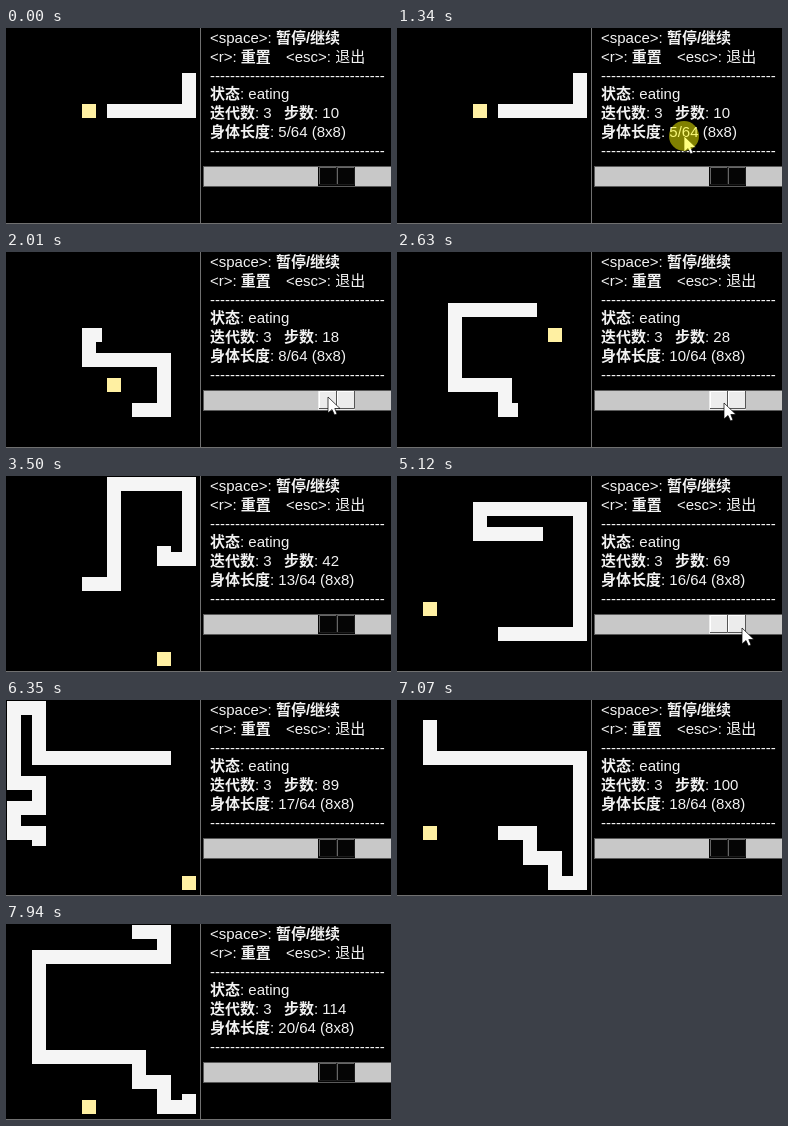
Animation, 385 px wide and 196 px high, one loop 7.99 s. Source, as an HTML page:

```html
<!DOCTYPE html>
<html lang="zh">
<head>
<meta charset="utf-8">
<title>Snake</title>
<style>
  html, body { margin: 0; width: 100%; height: 100%; overflow: hidden; background: #000; }
  svg { display: block; width: 385px; height: 196px; }
  text { font: 15px "Liberation Sans", "Noto Sans CJK SC", "Noto Sans CJK", sans-serif; fill: #f2f2f2; white-space: pre; }
  .b { font-weight: bold; }
  #snake { fill: none; stroke: #f5f5f5; stroke-width: 14; stroke-linecap: square; stroke-linejoin: miter; }
  #food { fill: #fff0a2; }
  #thumb { --face: #050505; --light: #666; --dark: #1c1c1c; }
  #thumb.hover { --face: #ececec; --light: #fff; --dark: #555; }
  .face { fill: var(--face); }
  .light { fill: none; stroke: var(--light); }
  .dark { fill: none; stroke: var(--dark); }
</style>
</head>
<body>
<svg viewBox="0 0 385 196">
  <defs>
    <g id="half">
      <rect class="face" width="18" height="18"/>
      <path class="dark" d="M0 17.5H17.5V0"/>
      <path class="light" d="M.5 17V.5H17"/>
    </g>
  </defs>
  <rect width="385" height="196"/>
  <path d="M194.5 0V195M0 195.5H385" stroke="#707070" fill="none"/>
  <rect id="food" width="14" height="14"/>
  <polyline id="snake"/>

  <text x="204" y="15">&lt;space&gt;: <tspan class="b">暂停/继续</tspan></text>
  <text x="204" y="34">&lt;r&gt;: <tspan class="b">重置</tspan></text>
  <text x="280" y="34">&lt;esc&gt;: 退出</text>
  <text class="rule" x="204" y="53"></text>
  <text x="204" y="71"><tspan class="b">状态</tspan>: eating</text>
  <text x="204" y="90"><tspan class="b">迭代数</tspan>: 3</text>
  <text x="278" y="90"><tspan class="b">步数</tspan>: <tspan id="steps">10</tspan></text>
  <text x="204" y="109"><tspan class="b">身体长度</tspan>: <tspan id="size">5</tspan>/64 (8x8)</text>
  <text class="rule" x="204" y="128"></text>

  <rect x="197.5" y="138.5" width="190" height="20" fill="#c8c8c8" stroke="#5a5a5a"/>
  <g id="thumb">
    <rect class="face" x="312" y="139" width="37" height="19"/>
    <use href="#half" x="313" y="139"/>
    <use href="#half" x="331" y="139"/>
  </g>

  <g id="cursor">
    <path d="M0 0V16L4 12.5L6.5 18L9 17L6.8 11.5H12Z" fill="#fff" stroke="#000" stroke-width=".7"/>
    <circle id="click" r="15" fill="#ff0" opacity=".5"/>
  </g>
</svg>
<script>
const LOOP = 7990, STEP_MS = 61.8, CLOCK_START = 844;
const FIRST_STEP = 5, PAUSED_STEP = 10, BASE_SIZE = 5;
const $ = id => document.getElementById(id);

// Cells (column, row) the snake steers for; a star marks food
const goals = "33* 64* 66* 45* 25* 62 63* 70* 44* 34 67* 32 31* 71* 16 " +
  "15* 05 14 03 10 12 72 77* 66 56 55 15* 61* 50 37*";

// Keep straight on while that helps, otherwise turn towards the goal
function walk(goals) {
  const cells = [{ x: 7, y: 1 }];
  let dx = 0, dy = 1;
  for (const goal of goals.split(" ")) {
    const [gx, gy] = [...goal].map(Number);
    let { x, y } = cells.at(-1);
    while (x !== gx || y !== gy) {
      if (dx * (gx - x) + dy * (gy - y) <= 0) {
        [dx, dy] = dx ? [0, Math.sign(gy - y)] : [Math.sign(gx - x), 0];
      }
      cells.push({ x: x += dx, y: y += dy });
    }
    cells.at(-1).food = goal.endsWith("*");
  }
  return cells;
}
const cells = walk(goals);
const center = ({ x, y }) => [8 + 25 * x, 8 + 25 * y];

function drawGame(t) {
  const step = Math.max(PAUSED_STEP, Math.floor((t - CLOCK_START) / STEP_MS));
  const head = step - FIRST_STEP;
  const size = BASE_SIZE + cells.slice(0, head + 1).filter(c => c.food).length;
  const tail = head - size + 1;

  // The tail keeps half of the link to the cell it just left
  const end = center(cells[tail]), left = center(cells[tail - 1]);
  const stub = end.map((v, i) => v + 6 * Math.sign(left[i] - v));
  const body = cells.slice(tail, head + 1).map(center);
  $("snake").setAttribute("points", [stub, ...body].join(" "));

  const food = cells.slice(head + 1).find(c => c.food);
  const [fx, fy] = center(food);
  $("food").setAttribute("transform", `translate(${fx - 7} ${fy - 7})`);
  $("food").style.display = cells[head].food ? "none" : "";
  $("steps").textContent = step;
  $("size").textContent = size;
}

// Pointer visits: time, x, y
const visits = [
  [[570, 330, 192], [1340, 287, 108], [2210, 327, 151], [2630, 327, 151], [3030, 385, 150]],
  [[4720, 385, 165], [5120, 345, 152], [5800, 348, 150]]
];
const ease = k => k * k * (3 - 2 * k);

function pointerAt(t) {
  const visit = visits.find(v => t >= v[0][0] && t < v.at(-1)[0]);
  if (!visit) return null;
  const i = visit.findIndex(stop => stop[0] > t);
  const [t0, ...from] = visit[i - 1], [t1, ...to] = visit[i];
  const k = ease((t - t0) / (t1 - t0));
  return from.map((v, j) => Math.round(v + (to[j] - v) * k));
}

function drawPointer(t) {
  const pointer = pointerAt(t);
  $("cursor").style.display = pointer ? "" : "none";
  let over = false;
  if (pointer) {
    const [x, y] = pointer;
    $("cursor").setAttribute("transform", `translate(${x} ${y})`);
    over = x >= 312 && x < 349 && y >= 139 && y < 158;
  }
  $("click").style.display = t >= 1290 && t < 1440 ? "" : "none";
  $("thumb").classList.toggle("hover", over);
}

for (const rule of document.querySelectorAll(".rule")) rule.textContent = "-".repeat(35);

const start = performance.now();
function frame() {
  const t = (performance.now() - start) % LOOP;
  drawGame(t);
  drawPointer(t);
  requestAnimationFrame(frame);
}
frame();
</script>
</body>
</html>
```
